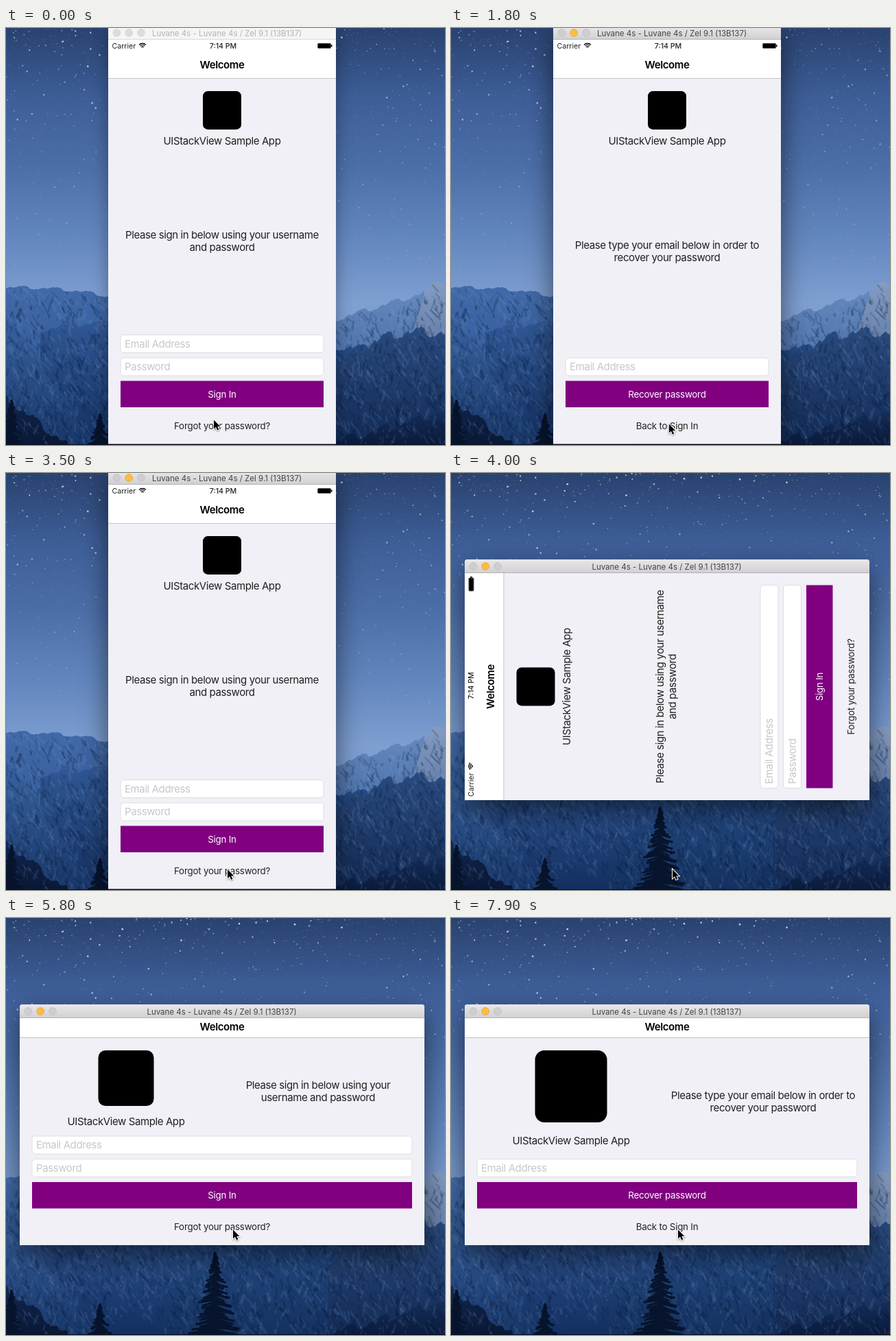
An HTML page with a canvas for the animation above (8000 ms loop, 640x608 px).

```html
<!DOCTYPE html>
<html lang="en">
<head>
<meta charset="utf-8">
<title>Sign-in demo</title>
<style>
html, body { margin: 0; width: 100%; height: 100%; overflow: hidden; background: #1d3a6c; }
canvas { display: block; }
</style>
</head>
<body>
<canvas id="stage" width="640" height="608"></canvas>
<script>
const LOOP = 8000, FONT = 'Inter, "Open Sans", sans-serif';
const PURPLE = '#800080', INK = '#202022', PAPER = '#f0f0f6';
const ctx = document.getElementById('stage').getContext('2d');
const backdrop = document.createElement('canvas');
backdrop.width = 640;
backdrop.height = 608;

const lerp = (a, b, k) => a + (b - a) * k;
const ease = (t, from, to) => {
  const k = Math.min(1, Math.max(0, (t - from) / (to - from)));
  return k * k * (3 - 2 * k);
};

let seed = 7;
function rnd() {
  seed = (seed * 1664525 + 1013904223) >>> 0;
  return seed / 4294967296;
}

function gradient(c, y0, y1, ...stops) {
  const g = c.createLinearGradient(0, y0, 0, y1);
  stops.forEach((s, i) => g.addColorStop(i / (stops.length - 1), s));
  return g;
}

// ---------- night landscape ----------
function sky(c) {
  c.fillStyle = gradient(c, 0, 400, '#29426f', '#3d5d97', '#4c6ea8', '#6185bd', '#7f9fd1');
  c.fillRect(0, 0, 640, 608);
  for (let i = 0; i < 1900; i++) {
    const y = Math.pow(rnd(), 1.4) * 350, r = .35 + Math.pow(rnd(), 5);
    c.fillStyle = `rgba(225,236,255,${(.2 + rnd() * .75) * (1 - y / 450)})`;
    c.beginPath();
    c.arc(rnd() * 640, y, r, 0, 7);
    c.fill();
  }
}

// A bulging, jagged skyline from one point to another, with light and dark rock below
function ridge(c, [x0, y0], [x1, y1], bulge, rough, high, low) {
  const phase = rnd() * 7;
  const skyline = x => {
    const k = (x - x0) / (x1 - x0);
    let y = lerp(y0, y1, k) - bulge * Math.sin(Math.PI * k);
    for (let f = 1; f < 9; f *= 2) y += rough / f * Math.sin(x * f * .13 + phase * f);
    return y;
  };
  c.save();
  c.beginPath();
  c.moveTo(x0, 608);
  for (let x = x0; x <= x1; x++) c.lineTo(x, skyline(x));
  c.lineTo(x1, 608);
  c.fillStyle = gradient(c, Math.min(y0, y1) - bulge, 608, high, low);
  c.fill();
  c.clip();
  for (let i = 0; i < (x1 - x0) * 3; i++) {
    const x = lerp(x0, x1, rnd()), y = skyline(x) + rnd() * 150, len = 3 + rnd() * 13;
    c.strokeStyle = rnd() < .45 ? 'rgba(130,162,208,.13)' : 'rgba(7,22,52,.2)';
    c.lineWidth = 1 + rnd() * 3;
    c.beginPath();
    c.moveTo(x, y);
    c.lineTo(x + len * (rnd() * 1.6 - .5), y + len);
    c.stroke();
  }
  c.restore();
}

function tree(c, x, top, spread) {
  c.strokeStyle = '#07142c';
  c.lineWidth = 3;
  for (let y = top; y < 612; y += 2.5) {
    const w = 2 + (y - top) * spread;
    for (const side of [-1, 1]) {
      c.beginPath();
      c.moveTo(x, y - 3);
      c.lineTo(x + side * w * (.4 + rnd() * .65), y + rnd() * 5);
      c.stroke();
    }
  }
}

function paintBackdrop() {
  const c = backdrop.getContext('2d');
  sky(c);
  ridge(c, [0, 378], [260, 425], 14, 2, '#426ba9', '#2a5090');
  ridge(c, [380, 455], [610, 386], 0, 3, '#6488bd', '#2c5492');
  ridge(c, [594, 440], [640, 376], 30, 1, '#8ea4c8', '#2c4d82');
  ridge(c, [50, 440], [480, 500], 36, 3, '#345d9c', '#132f60');
  ridge(c, [0, 412], [130, 608], 0, 4, '#3a64a2', '#183769');
  ridge(c, [230, 540], [640, 480], 40, 4, '#27508c', '#14315f');
  ridge(c, [470, 500], [640, 445], 22, 6, '#2c4d82', '#122b55');
  ridge(c, [0, 540], [90, 608], 0, 5, '#10264e', '#0a1835');
  ridge(c, [470, 606], [640, 560], 0, 5, '#142d58', '#0b1b3c');
  tree(c, 305, 490, .33);
  tree(c, 137, 565, .42);
  tree(c, 8, 545, .3);
  c.fillStyle = '#050b18';
  c.fillRect(0, 607, 640, 1);
}

// ---------- drawing helpers ----------
function text(str, x, y, size, color = INK, o = {}) {
  ctx.font = `${o.weight || 400} ${size}px ${FONT}`;
  ctx.letterSpacing = (o.track ?? 0) + 'px';
  ctx.textAlign = o.align || 'center';
  ctx.textBaseline = 'alphabetic';
  ctx.fillStyle = color;
  ctx.fillText(str, x, y + size * .36);
}

function round(x, y, w, h, r, fill, stroke) {
  ctx.beginPath();
  ctx.roundRect(x, y, w, h, r);
  ctx.fillStyle = fill;
  ctx.fill();
  if (stroke) {
    ctx.strokeStyle = stroke;
    ctx.lineWidth = 1;
    ctx.stroke();
  }
}

function clipped(x, y, w, h, draw) {
  if (h <= .01) return;
  ctx.save();
  ctx.beginPath();
  ctx.rect(x, y, w, h);
  ctx.clip();
  draw();
  ctx.restore();
}

const body = (str, x, y, color, align) => text(str, x, y, 15, color, { track: -.4, align });
const caption = (str, x, y, color) => text(str, x, y, 13.3, color, { track: -.2 });

function field(hint, y, w, h) {
  if (h < .5) return;
  round(18, y + .5, w, h - 1, Math.min(4.5, h / 2), '#fff', '#dddde2');
  clipped(18, y, w, h, () => body(hint, 24, y + Math.max(h / 2, 7), '#c7c7cd', 'left'));
}

function button(label, y, w, h) {
  if (h < .3) return;
  ctx.fillStyle = PURPLE;
  ctx.fillRect(18, y, w, h);
  caption(label, 18 + w / 2, y + h / 2, '#fff');
}

// A label whose text stays at the top once its box gets too short
function label(lines, x, top, h, w) {
  const mid = top + Math.max(h / 2, 18);
  clipped(x - w / 2, top, w, h, () => lines.forEach((s, i) => body(s, x, mid - 9 + i * 18)));
}

// ---------- app ----------
function statusBar(w) {
  text('Carrier', 5.5, 9.5, 10.6, INK, { align: 'left' });
  ctx.strokeStyle = '#000';
  ctx.lineWidth = 1.4;
  for (let r = 2.2; r < 8; r += 2.4) {
    ctx.beginPath();
    ctx.arc(50, 13, r, -Math.PI * .75, -Math.PI * .25);
    ctx.stroke();
  }
  text('7:14 PM', w / 2 + 1.5, 9.5, 10.6, INK, { weight: 500 });
  round(w - 26.5, 6, 19, 7, 1.2, '#000', '#555');
  ctx.fillStyle = '#000';
  ctx.fillRect(w - 7, 8, 1.5, 3);
}

// p: sign-in 0 .. recovery 1;  q: portrait 0 .. landscape 1
function app(p, q, leaving) {
  const at = (a, b) => lerp(a, b, q);
  const w = at(332, 590), h = at(590, 331), row = w - 36, mid = w / 2;
  ctx.translate(-w / 2, -h / 2);
  ctx.fillStyle = PAPER;
  ctx.fillRect(0, 0, w, h);

  const nav = at(56.5, 28);
  ctx.fillStyle = '#fff';
  ctx.fillRect(0, 0, w, nav);
  ctx.fillStyle = '#c4c4c8';
  ctx.fillRect(0, nav, w, 1);
  if (q < 1) {
    ctx.globalAlpha = 1 - q;
    statusBar(w);
    ctx.globalAlpha = 1;
  }
  text('Welcome', mid, at(37.5, 13), 15, '#000', { weight: 600, track: -.4 });

  const left = at(mid, 155), size = at(56, 81 + 24 * p);
  round(left - size / 2, at(75.5, 47), size, size, size * .13, '#000');
  body('UIStackView Sample App', left, at(148.5, 151 + 28 * p));

  const right = at(mid, 435), top = at(158, 47), full = at(272, 119);
  const split = full * (1 - p), room = at(row, 290);
  label(q < .5
    ? ['Please sign in below using your username', 'and password']
    : ['Please sign in below using your', 'username and password'], right, top, split, room);
  label(['Please type your email below in order to', 'recover your password'],
    right, top + split, full + 33.5 * p - split - 4 * p, room);

  const base = h - 92;
  field('Email Address', base - 67.5 + 33.5 * p, row, 27);
  field('Password', base - 34 + 29 * p, row, 27 * (1 - p));
  button('Recover password', base, row, 38.5 * p);
  if (p > 0) caption('Back to Sign In', mid, base + 65.5 * p, leaving ? '#a9a9ad' : '#222');
  button('Sign In', base + 88 * p, row, 38.5 * (1 - p));
  if (p < 1) caption('Forgot your password?', mid, base + 65.5 + 23 * p, p > 0 && !leaving ? '#4a4a4c' : '#222');
}

function windowFrame(x, y, w, h, active, titleX) {
  ctx.save();
  ctx.shadowColor = active ? 'rgba(0,0,0,.55)' : 'rgba(0,0,0,.35)';
  ctx.shadowBlur = active ? 38 : 24;
  ctx.shadowOffsetY = active ? 14 : 8;
  round(x, y, w, h, [4, 4, 0, 0], '#ddd');
  ctx.restore();
  round(x, y, w, 20, [4, 4, 0, 0], active ? gradient(ctx, y, y + 20, '#e9e7e9', '#d1cfd1') : '#f5f5f5');
  ctx.fillStyle = active ? '#b4b2b4' : '#d8d8d8';
  ctx.fillRect(x, y + 19, w, 1);
  for (let i = 0; i < 3; i++) {
    const amber = active && i === 1;
    ctx.beginPath();
    ctx.arc(x + 12.4 + i * 17.8, y + 10, 5.4, 0, 7);
    ctx.fillStyle = amber ? '#fdbc40' : active ? '#cfcdcf' : '#dcdcdc';
    ctx.fill();
    ctx.strokeStyle = amber ? '#e0a135' : active ? '#bebcbe' : '#d0d0d0';
    ctx.lineWidth = .7;
    ctx.stroke();
  }
  text('Luvane 4s - Luvane 4s / Zel 9.1 (13B137)', titleX, y + 10.5, 11.5, active ? '#454345' : '#b3b3b3');
}

const arrow = new Path2D('M0 0V13L3 10.3L5.2 15L7.4 14L5.3 9.4H9.4Z');

function cursor(t) {
  const a = ease(t, 400, 800), b = ease(t, 1400, 2000), c = ease(t, 4900, 5600);
  ctx.save();
  ctx.translate(303 + 20 * b + 8 * c, 571.5 + 4.5 * a + 2 * b - 123.5 * c);
  ctx.shadowColor = 'rgba(0,0,0,.4)';
  ctx.shadowBlur = 2;
  ctx.shadowOffsetY = 1;
  ctx.strokeStyle = '#fff';
  ctx.lineWidth = 2;
  ctx.stroke(arrow);
  ctx.shadowColor = 'transparent';
  ctx.fillStyle = '#000';
  ctx.fill(arrow);
  ctx.restore();
}

function draw(t) {
  const p = ease(t, 500, 1010) - ease(t, 2410, 2920) + ease(t, 6200, 6700);
  const q = ease(t, 4000, 4400), wide = t >= 3700;
  const leaving = t >= 2300 && t < 3000;
  ctx.drawImage(backdrop, 0, 0);
  if (wide) windowFrame(20, 126, 590, 351, true, 314.5);
  else windowFrame(149, -3, 332, 609.5, t >= 400, 322);

  const box = wide ? [20, 146, 590, 331] : [149, 17, 332, 589.5];
  clipped(...box, () => {
    ctx.fillStyle = '#000';
    ctx.fillRect(...box);
    ctx.translate(315, 311.5);
    if (wide) ctx.rotate(-Math.PI / 2 * (1 - q));
    app(p, q, leaving);
  });
  cursor(t);
}

paintBackdrop();
const start = performance.now();
function tick() {
  const t = (performance.now() - start) % LOOP;
  draw(Math.floor(t / 100) * 100);
  requestAnimationFrame(tick);
}
tick();
</script>
</body>
</html>
```
